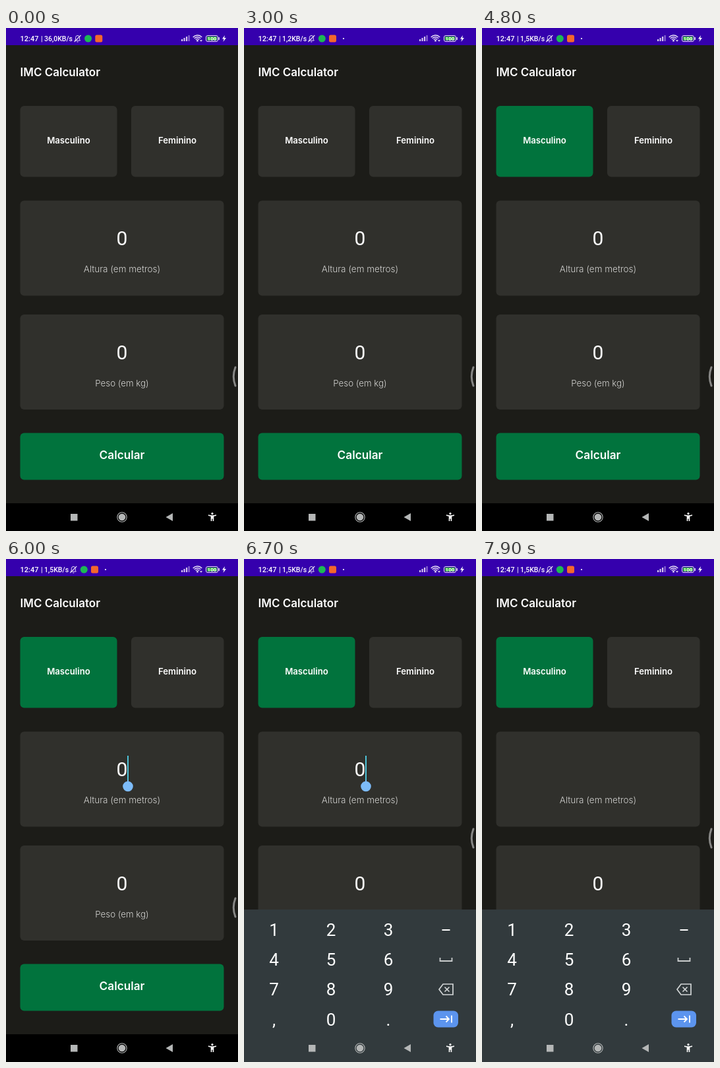
Recreate the animation shown at these times as an HTML page with a canvas. Size 352x762 px, loop 8 s.

```html
<!DOCTYPE html>
<html lang="pt">
<head>
<meta charset="utf-8">
<title>IMC Calculator</title>
<style>
html, body { margin: 0; width: 100%; height: 100%; overflow: hidden; background: #1c1c18; }
canvas { display: block; width: 352px; height: 762px; }
</style>
</head>
<body>
<canvas id="stage"></canvas>
<script>
const W = 352, H = 762, LOOP = 8000;
const canvas = document.getElementById('stage');
const ctx = canvas.getContext('2d');
const ratio = window.devicePixelRatio || 1;
canvas.width = W * ratio;
canvas.height = H * ratio;

const UI = 'Inter, sans-serif';
const SYS = 'Roboto, sans-serif';
const GREEN = '#01733d', CARD = '#30302c', WHITE = '#fff';
const KEYS = ['123', '456', '789', ',0.'];
const COLUMNS = [45.5, 132, 219, 306.5];
const ROWS = [31, 76, 121, 167];

const within = (t, start, end) => t >= start && t < end;

function rect(x, y, w, h, color, r = 0) {
  ctx.fillStyle = color;
  ctx.beginPath();
  ctx.roundRect(x, y, w, h, r);
  ctx.fill();
}

function disc(x, y, r, color) {
  ctx.fillStyle = color;
  ctx.beginPath();
  ctx.arc(x, y, r, 0, Math.PI * 2);
  ctx.fill();
}

function fillPath(d, color) {
  ctx.fillStyle = color;
  ctx.fill(new Path2D(d));
}

function strokePath(d, color, width, cap = 'butt') {
  ctx.strokeStyle = color;
  ctx.lineWidth = width;
  ctx.lineCap = cap;
  ctx.stroke(new Path2D(d));
}

function label(text, x, y, font, color = WHITE, align = 'center') {
  ctx.font = font;
  ctx.fillStyle = color;
  ctx.textAlign = align;
  ctx.fillText(text, x, y);
}

function at(x, y, draw) {
  ctx.save();
  ctx.translate(x, y);
  draw();
  ctx.restore();
}

function mutedBell() {
  strokePath('M-4 3H4L3 1.5V-1.5A3 3 0 0 0 -3 -1.5V1.5ZM-1 5H1M0 -5V-4', '#e6def5', 1);
  strokePath('M-5 5L5 -5', '#e6def5', 1.1);
}

function signalAndBattery() {
  for (let i = 0; i < 4; i++) {
    const h = 3 + i * 2;
    rect(266 + i * 3.5, 20 - h, 2.2, h, i < 3 ? '#d4c6ee' : '#8b6bd0');
  }
  for (const r of [9, 6.3, 3.6]) {
    ctx.strokeStyle = '#efe9fa';
    ctx.lineWidth = 1.4;
    ctx.beginPath();
    ctx.arc(290.5, 20, r, -Math.PI * 0.77, -Math.PI * 0.23);
    ctx.stroke();
  }
  disc(290.5, 19.2, 1.3, WHITE);
  fillPath('M294 18H298L296 21Z', '#cfc2ec');

  ctx.strokeStyle = '#e6e2f0';
  ctx.lineWidth = 1;
  ctx.beginPath();
  ctx.roundRect(303.5, 11.5, 18, 9, 2.5);
  ctx.stroke();
  rect(305, 13, 15, 6, '#36b83e', 1);
  rect(322.5, 14, 1.5, 4, '#e6e2f0');
  label('100', 312.5, 18.9, `bold 8px ${SYS}`);
  fillPath('M332 11L328 16.6H330.6L329.4 21L334 15H331.2Z', WHITE);
}

function statusBar(t) {
  const quiet = t >= 600;
  const rate = !quiet ? '36,0KB/s' : t < 4400 ? '1,2KB/s' : '1,5KB/s';
  rect(0, 0, W, 26, '#3500ad');
  label('12:47', 21.5, 20, `500 11px ${SYS}`, WHITE, 'left');
  label('|', 53, 19.5, `500 10.5px ${SYS}`, WHITE, 'left');
  label(rate, 58, 20, `500 10.5px ${SYS}`, WHITE, 'left');
  at(quiet ? 0 : 6.3, 0, () => {
    at(102.3, 16, mutedBell);
    disc(118.3, 16, 5.5, '#1db954');
    rect(129, 10.5, 11, 11, '#f4672c', 2.5);
  });
  if (quiet) disc(151, 16, 1.1, WHITE);
  signalAndBattery();
}

function form(t) {
  const bold = size => `600 ${size}px ${UI}`;
  label('IMC Calculator', 21.5, 73, bold(17), WHITE, 'left');

  rect(21.5, 118, 147, 107.5, t >= 3700 ? GREEN : CARD, 6);
  rect(190, 118, 140.5, 107.5, CARD, 6);
  label('Masculino', 95, 175, bold(13.2));
  label('Feminino', 260, 175, bold(13.2));

  rect(21.5, 261.5, 309, 144, CARD, 6);
  rect(21.5, 434, 309, 144, CARD, 6);
  if (t < 7100) label('0', 176, 329.3, `30px ${SYS}`);
  label('0', 176, 502.3, `30px ${SYS}`);
  label('Altura (em metros)', 176, 369.5, `300 13.5px ${UI}`, '#d2d2d0');
  label('Peso (em kg)', 176, 542.5, `300 13.3px ${UI}`, '#d2d2d0');

  rect(21.5, 613.5, 309, 71, GREEN, 6);
  label('Calcular', 176, 653, bold(17.2));
}

function textCursor(t) {
  const blinkOn = within(t, 5700, 6300) || within(t, 6700, 7100);
  if (blinkOn) rect(184, 298, 2, 40, within(t, 6200, 6300) ? '#6eb0ee' : '#4dc3d8');
  if (within(t, 5700, 7100)) {
    disc(185, 344.5, 7.8, '#7dbcfa');
    rect(184, 335, 2, 3, '#7dbcfa');
  }
  if (within(t, 7100, 7600)) rect(175.5, 298, 2, 40, '#4dc3d8');
}

function keyboard(t) {
  at(0, t < 6300 ? 543 : 531, () => {
    rect(0, 0, W, H, '#323a3d');
    if (within(t, 7000, 7200)) rect(264, 100, 85, 43, '#465055', 5);
    KEYS.forEach((row, r) => [...row].forEach((key, c) =>
      label(key, COLUMNS[c], ROWS[r] + 9.3, `26px ${SYS}`)));
    strokePath('M300.5 31H312.5', WHITE, 2);
    strokePath('M297.5 73V78H315.5V73', '#c9cccd', 1.8);
    strokePath('M302 113H317V129H302L296 121Z', '#d3d6d7', 1.7);
    strokePath('M304.5 117.5L311.5 124.5M311.5 117.5L304.5 124.5', '#d3d6d7', 1.7);
    rect(287.5, 153.5, 37.5, 25, '#5c94ee', 7);
    strokePath('M297.5 166H311M306.5 161.5L311 166L306.5 170.5M315 160.5V171.5', WHITE, 1.8);
  });
}

function navigation() {
  const gray = '#b5b7b7';
  rect(98, 736, 10.5, 10.5, gray);
  disc(176, 741, 5.3, gray);
  ctx.strokeStyle = gray;
  ctx.lineWidth = 1.1;
  ctx.beginPath();
  ctx.arc(176, 741, 7.2, 0, Math.PI * 2);
  ctx.stroke();
  fillPath('M242.5 741L253 735V747Z', gray);
  disc(313, 735.6, 1.6, WHITE);
  fillPath('M307 737.3Q313 739 319 737.3V739L315.3 739.7V747H313.7V743.5H312.3V747H310.7V739.7L307 739Z', WHITE);
}

function edgeHandle(y) {
  at(0, y, () => strokePath('M348 -14Q342.6 0 348 14', '#878785', 3, 'round'));
}

function render(now) {
  const t = now % LOOP;
  ctx.setTransform(ratio, 0, 0, ratio, 0, 0);
  rect(0, 0, W, H, '#1c1c18');
  form(t);
  textCursor(t);
  statusBar(t);
  if (t < 6200) rect(0, 720, W, 42, '#000');
  else keyboard(t);
  navigation();
  edgeHandle(t < 6300 ? 528 : 423);
}

const start = performance.now();
function tick() {
  render(performance.now() - start);
  requestAnimationFrame(tick);
}
tick();
</script>
</body>
</html>
```
